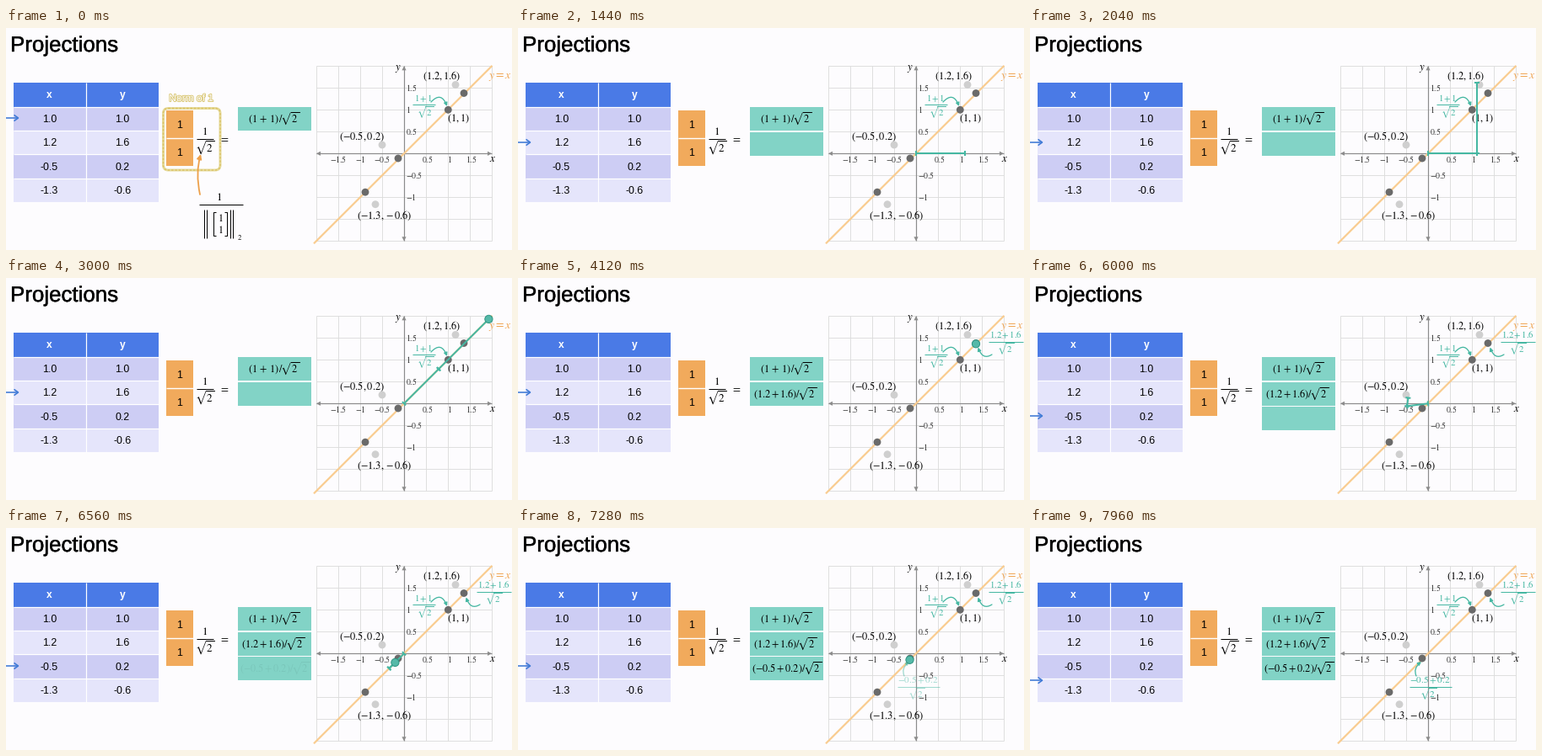
Animation, 600 px wide and 264 px high, one loop 8 s. Source, as a matplotlib script:

```python
import numpy as np
import matplotlib.pyplot as plt
from matplotlib import patheffects
from matplotlib.animation import FuncAnimation
from matplotlib.patches import Circle, FancyArrowPatch, FancyBboxPatch, Polygon, Rectangle
from matplotlib.path import Path

W, H, DPI = 600, 264, 100
STEP, FRAMES = 40, 200
PX = 72 / DPI

PAPER = "#fdfcfe"
TEAL, TEAL_BOX = "#45b7a2", "#82d3c6"
ORANGE, ORANGE_BOX = "#eda04a", "#f1aa5c"
BLUE, DARK, PALE = "#4a7ae6", "#6a6a6a", "#cfcfcf"
ORIGIN = np.array([472.0, 149.3])
CELL = 26

plt.rcParams["mathtext.fontset"] = "stix"
plt.rcParams["font.family"] = "Liberation Sans"

fig = plt.figure(figsize=(W / DPI, H / DPI), dpi=DPI, facecolor=PAPER)
ax = fig.add_axes([0, 0, 1, 1])
ax.set_xlim(0, W)
ax.set_ylim(H, 0)
ax.axis("off")


def text(x, y, s, size, color="black", ha="center", z=5, **kw):
    """Write s with its digits centred vertically on y."""
    return ax.text(x, y + 0.34 * size, s, fontsize=size * PX, color=color,
                   ha=ha, va="baseline", zorder=z, **kw)


def math(x, y, s, size, color="black", **kw):
    return text(x, y, f"${s}$", size, color, **kw)


def outline(color, width):
    return [patheffects.withStroke(linewidth=width * PX, foreground=color)]


def line(xs, ys, color="black", width=1.0, z=4, **kw):
    return ax.plot(xs, ys, color=color, lw=width * PX, zorder=z,
                   solid_capstyle="butt", **kw)[0]


def rect(x0, y0, x1, y1, color, z=1):
    return ax.add_patch(Rectangle((x0, y0), x1 - x0, y1 - y0, fc=color, ec="none", zorder=z))


def dot(x, y, color, r=4.4, edge="none", z=6):
    return ax.add_patch(Circle((x, y), r, fc=color, ec=edge, lw=PX, zorder=z))


def curve(start, ctrl, end, color, width=1.3, head=6):
    path = Path([start, ctrl, end], [Path.MOVETO, Path.CURVE3, Path.CURVE3])
    return ax.add_patch(FancyArrowPatch(path=path, arrowstyle="-|>", color=color, lw=width * PX,
                                        mutation_scale=head, zorder=7))


def fraction(x, y, top, half, size, color, shift=0):
    """Fraction over the square root of two, with its bar at y."""
    return [math(x, y - 8, top, size, color, z=7),
            line([x - half, x + half], [y, y], color, 1, z=7),
            math(x + shift, y + 10, r"\sqrt{2}", size, color, z=7)]


def draw_table():
    edges = [65, 93.8, 121.7, 150, 178.6, 207]
    fills = [BLUE, "#cdcdf4", "#e5e5fb", "#cdcdf4", "#e5e5fb"]
    rows = [("x", "y"), ("1.0", "1.0"), ("1.2", "1.6"), ("-0.5", "0.2"), ("-1.3", "-0.6")]
    for i, (fill, cells) in enumerate(zip(fills, rows)):
        rect(9, edges[i], 181, edges[i + 1], fill)
        for x, s in zip((51.5, 138), cells):
            y = (edges[i] + edges[i + 1]) / 2
            if i:
                text(x, y, s, 12.4)
            else:
                text(x, y - 0.5, s, 12, "white", weight="bold")
    line([94.7, 94.7], [65, 207], "white", 1.2)
    for y in edges[1:-1]:
        line([9, 181], [y, y], "white", 1.2)


def draw_vector():
    rect(189.5, 98, 222, 164, ORANGE_BOX, z=2)
    line([189.5, 222], [131, 131], "white", 1.4)
    text(205.5, 114.5, "1", 12.4)
    text(205.5, 148, "1", 12.4)
    math(236, 122.5, "1", 13)
    line([225.5, 246], [132, 132], "black", 1)
    math(235.5, 143, r"\sqrt{2}", 13)
    math(258.7, 131, "=", 13)


def draw_norm():
    """Frame around the vector and the spelled-out norm below it."""
    def frame(color, width, style):
        return ax.add_patch(FancyBboxPatch(
            (186.5, 95.5), 67.5, 73.5, boxstyle="round,pad=0,rounding_size=6", fc="none",
            ec=color, lw=width * PX, ls=style, zorder=3))

    parts = [frame("#e6dc9c", 3, "-"), frame("#dcc46c", 1.6, (0, (1.6, 1.1)))]
    parts.append(text(219.8, 83, "Norm of 1", 12, PAPER,
                      path_effects=outline("#d9c670", 1.8)))
    parts.append(curve((230, 198), (224.5, 172), (231, 150), ORANGE, 1.8, 8))
    parts.append(math(253, 200.5, "1", 13))
    parts.append(line([229, 281], [210.3, 210.3], "black", 1))
    for x in (235, 238, 265.5, 268.5):
        parts.append(line([x, x], [216, 249.5], "black", 1))
    for x, d in ((246, 3), (262, -3)):
        parts.append(line([x + d, x, x, x + d], [219, 219, 247, 247], "black", 1))
    parts += [math(254, 226, "1", 12), math(254, 239.5, "1", 12), math(277, 249.5, "2", 8.5)]
    return parts


def draw_plot():
    ox, oy = ORIGIN
    lo, hi = -4 * CELL, 4 * CELL
    for k in range(-4, 5):
        line([ox + k * CELL] * 2, [oy + lo, oy + hi], "#dcdcdc", 0.9, z=1)
        line([ox + lo, ox + hi], [oy + k * CELL] * 2, "#dcdcdc", 0.9, z=1)
    for d in (np.array([1, 0]), np.array([0, 1])):
        side = d[::-1]
        a, b = ORIGIN + lo * d, ORIGIN + hi * d
        line([a[0], b[0]], [a[1], b[1]], "#8c8c8c", 1.2, z=2)
        for tip, s in ((a, 1), (b, -1)):
            base = tip + 5 * s * d
            ax.add_patch(Polygon([tip, base + 2.6 * side, base - 2.6 * side], fc="#8c8c8c",
                                 ec="none", zorder=2))
    for k, s in ((-3, "{-}1.5"), (-2, "{-}1"), (-1, "{-}0.5"), (1, "0.5"), (2, "1"), (3, "1.5")):
        math(ox + k * CELL + (1.5 if k > 0 else 0), 156.5, s, 9.8, "#333333")
        if k > -3:
            math(473.5 if k != 2 else 474.5, oy - k * CELL, s, 9.8, "#333333", ha="left")
    math(577, 154.5, "x", 12.8)
    math(465, 46, "y", 12.8)
    line([365, 576.5], [256.3, 44.8], "#f9cc90", 2.2, z=3)
    math(571.7, 55, "y=x", 13.8, "#f0a552", ha="left")
    for x, y in ((533, 67.5), (446, 139), (438, 209.7)):
        dot(x, y, PALE)
    for x, y in ((524.3, 97.3), (543, 77.5), (465, 155), (426, 195.2)):
        dot(x, y, DARK)
    math(516.5, 57, "(1.2,1.6)", 12.3)
    math(536.5, 107, "(1,1)", 12.3)
    math(422.5, 128, "(-0.5,0.2)", 12.4)
    math(448.7, 222, r"(-1.3,\,{-}\,0.6)", 12.4)
    fraction(495, 91, "1+1", 13.5, 10.8, TEAL, 2)
    curve((504, 88), (516, 75), (523, 93), TEAL)


def ramp(t, a, b):
    u = min(max((t - a) / (b - a), 0), 1)
    return u * u * (3 - 2 * u)


def heading(deg):
    r = np.radians(deg)
    return np.array([np.cos(r), -np.sin(r)])


def bar(p, q, d):
    """Segment p-q along d with a tick at each end."""
    n = 3 * np.array([-d[1], d[0]])
    gap = np.full(2, np.nan)
    return np.array([p, q, gap, p - n, p + n, gap, q - n, q + n]).T


class Projection:
    """Lays two coordinates along the line and scales their sum."""

    def __init__(self, a, b, times, box_y, formula_x, formula, label):
        self.a, self.b, self.times = a, b, times
        self.box = rect(275, box_y, 361.5, box_y + 28, TEAL_BOX)
        self.formula = math(formula_x, box_y + 14, formula, 12.2)
        self.label = label
        self.bars = [line([], [], TEAL, 2, z=7) for _ in range(2)]
        self.dot = dot(0, 0, "#55b9a8", 4.6, "#2f9583", z=8)

    def draw(self, t):
        box, one, two, turn, mark, words, shrink, hide, name, leave = (
            ramp(t, *span) for span in self.times)
        scale = 1 - shrink * (1 - 0.5 ** 0.5)
        d1, d2 = heading(45 * turn), heading(90 - 45 * turn)
        p = ORIGIN + self.a * one * scale * d1
        q = p + self.b * two * scale * d2
        for ln, pts, grown in ((self.bars[0], bar(ORIGIN, p, d1), one),
                               (self.bars[1], bar(p, q, d2), two)):
            ln.set_data(*pts)
            ln.set_visible(grown > 0)
            ln.set_alpha(1 - hide)
        self.box.set_alpha(box)
        self.formula.set_alpha(words)
        self.dot.set_center(q)
        self.dot.set_alpha(mark * (1 - leave))
        fade(self.label, name)


def fade(parts, alpha):
    for p in parts:
        p.set_alpha(alpha)
        p.set_visible(alpha > 0)


text(5, 19.2, "Projections", 25.9, ha="left", path_effects=outline("black", 0.4))
draw_table()
draw_vector()
norm = draw_norm()
draw_plot()
rect(275, 94, 361.5, 122, TEAL_BOX)
math(318, 107.5, r"(1\,+\,1)\,/\!\sqrt{2}", 12.2)

label_b = fraction(578, 75.5, "1.2+1.6", 20.5, 10.8, TEAL)
label_b.append(curve((562, 91), (551, 98), (545.5, 82.5), TEAL))
label_c = fraction(474.5, 188.7, "{-}0.5+0.2", 25, 11.2, TEAL, -2)
label_c.append(curve((458, 176), (454, 167), (464, 159), TEAL))

projections = [
    Projection(58, 84, [(840, 1160), (1180, 1440), (1560, 1880), (2080, 2560), (2640, 2880),
                        (3040, 3320), (3280, 3680), (3600, 3720), (3700, 3960), (5260, 5480)],
               123.7, 316.5, r"(1.2+1.6)/\!\sqrt{2}", label_b),
    Projection(-25, 10, [(5000, 5380), (5480, 5640), (5680, 5840), (5920, 6240), (6280, 6440),
                         (6520, 6800), (6800, 7120), (7080, 7200), (7160, 7400), (7440, 7640)],
               153, 319, r"(-0.5+0.2)/\!\sqrt{2}", label_c),
]

shaft = line([0, 14], [0, 0], "#3f7ad6", 1.6)
barb = line([9.5, 14.5, 9.5], [0, 0, 0], "#3f7ad6", 1.6)


def update(i):
    t = i * STEP
    y = 107 + 29 * ramp(t, 360, 800) + 28 * ramp(t, 4480, 4960) + 29 * ramp(t, 7690, 8170)
    shaft.set_ydata([y, y])
    barb.set_ydata([y - 3.6, y, y + 3.6])
    fade(norm, 1 - ramp(t, 240, 520))
    for p in projections:
        p.draw(t)
    return []


anim = FuncAnimation(fig, update, frames=FRAMES, interval=STEP, init_func=lambda: update(0),
                     repeat=True, repeat_delay=0, blit=False)
plt.show()
```
